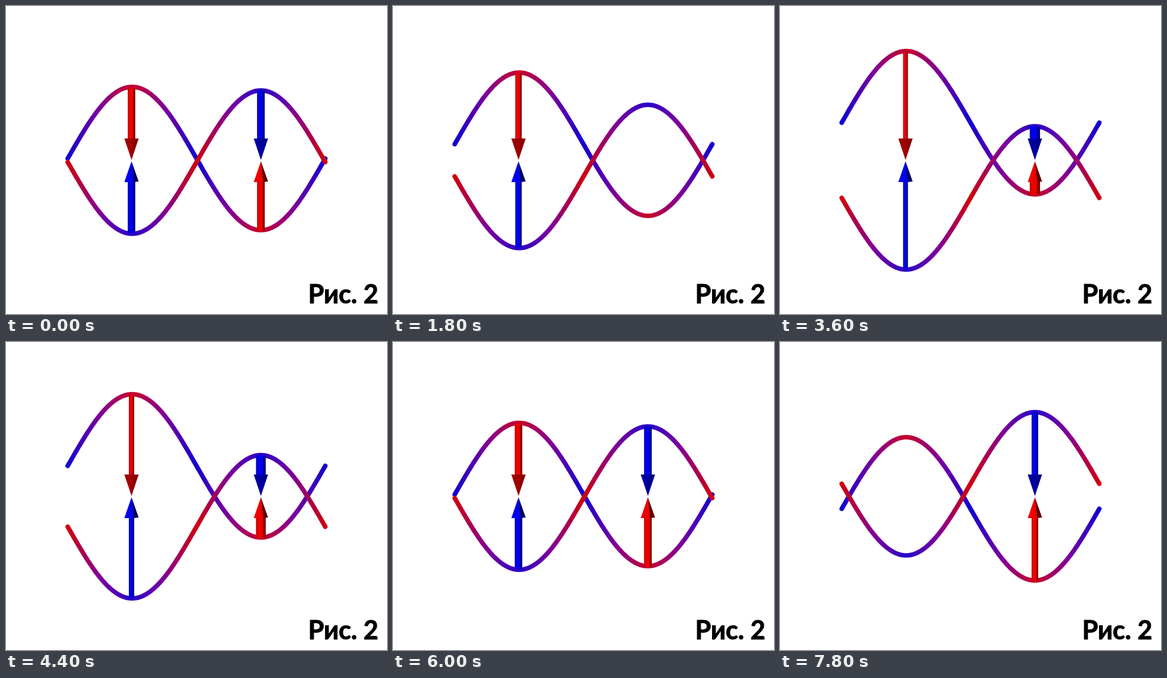
Animation, 639 px wide and 516 px high, one loop 8 s. Source, as an HTML page with a canvas:

```html
<!DOCTYPE html>
<html lang="ru">
<head>
<meta charset="utf-8">
<style>
  html, body { margin: 0; width: 100%; height: 100%; overflow: hidden; background: #fff; }
  canvas { display: block; }
  p {
    position: absolute; left: 492px; top: 457px; width: 147px; height: 50px; margin: 0;
    font: bold 43px/50px Lato, "Open Sans", sans-serif; text-align: center; white-space: nowrap;
    -webkit-text-stroke: 1px #000;
  }
</style>
</head>
<body>
<canvas id="stage" width="639" height="516"></canvas>
<p>Рис. 2</p>
<script>
const ctx = document.getElementById('stage').getContext('2d');
const LEFT = 103.5, RIGHT = 535.5, MID = 258.5, AMP = 120;
const TICK = 200, LOOP = 8000;

function gradient(x0, x1, stops) {
  const g = ctx.createLinearGradient(x0, 0, x1, 0);
  for (const [at, color] of stops) g.addColorStop(at, color);
  return g;
}

// Alternates node and peak colours, with violet halfway between
function waveColor(node, peak) {
  const cycle = [node, 'rgb(128,0,152)', peak, 'rgb(128,0,152)'];
  return gradient(LEFT, RIGHT, Array.from({ length: 9 }, (_, i) => [i / 8, cycle[i % 4]]));
}
const redPeaks = waveColor('rgb(16,0,210)', 'rgb(202,0,38)');
const bluePeaks = waveColor('rgb(208,0,12)', 'rgb(36,0,204)');

// Shift of the two waves away from the axis
function shiftAt(k) {
  if (k < 22) return 3 + 12 * Math.floor((k + 2) / 4);
  if (k < 32) return 51 - 12 * Math.floor((k - 22) / 2);
  return -9 - 12 * Math.floor((k - 32) / 4);
}

function wave(dir, shift, color) {
  ctx.beginPath();
  for (let x = LEFT; x <= RIGHT; x += 2) {
    const s = Math.sin((x - LEFT) / (RIGHT - LEFT) * 2 * Math.PI);
    ctx.lineTo(x, MID - dir * (shift + AMP * s));
  }
  ctx.strokeStyle = color;
  ctx.stroke();
}

function polygon(color, ...points) {
  ctx.beginPath();
  for (const [x, y] of points) ctx.lineTo(x, y);
  ctx.fillStyle = color;
  ctx.fill();
}

// dir -1: arrow above the axis pointing down, 1: below pointing up
function arrow(x, dir, length, red) {
  const shade = v => red ? `rgb(${v},0,0)` : `rgb(0,0,${v})`;
  const y = d => 259 + dir * d;
  const half = (21.5 - .074 * length) / 2;
  const shaft = gradient(x - half, x + half, [
    [0, shade(185)], [.15, shade(215)], [.22, shade(240)], [.66, shade(238)],
    [.72, shade(170)], [.88, shade(140)], [1, shade(100)]]);
  polygon(shaft, [x - half, y(34)], [x + half, y(34)], [x + half, y(length)], [x - half, y(length)]);
  if (dir < 0) {
    const head = gradient(x - 12, x + 12, [[0, shade(140)], [.4, shade(165)], [1, shade(120)]]);
    polygon(head, [x, y(1)], [x - 12, y(37)], [x + 12, y(37)]);
  } else {
    polygon(shade(238), [x, y(1)], [x - 12, y(36)], [x + 5, y(36)]);
    polygon(shade(90), [x, y(1)], [x + 4, y(36)], [x + 12, y(35)]);
  }
}

function pair(x, length, redTop) {
  arrow(x, -1, length, redTop);
  arrow(x, 1, length, !redTop);
}

function draw(now) {
  const k = Math.floor(now % LOOP / TICK);
  const shift = shiftAt(k), off = k % 2 === 1;
  ctx.clearRect(0, 0, 639, 516);
  ctx.lineWidth = 7.6;
  ctx.lineCap = ctx.lineJoin = 'round';
  wave(1, shift, redPeaks);
  wave(-1, shift, bluePeaks);
  if (!(off && k >= 32)) pair(210.5, AMP + shift - 2, true);
  if (!(off && k >= 2 && k < 22)) pair(427.5, AMP - shift, false);
}

const start = performance.now();
function loop() {
  draw(performance.now() - start);
  requestAnimationFrame(loop);
}
loop();
</script>
</body>
</html>
```
